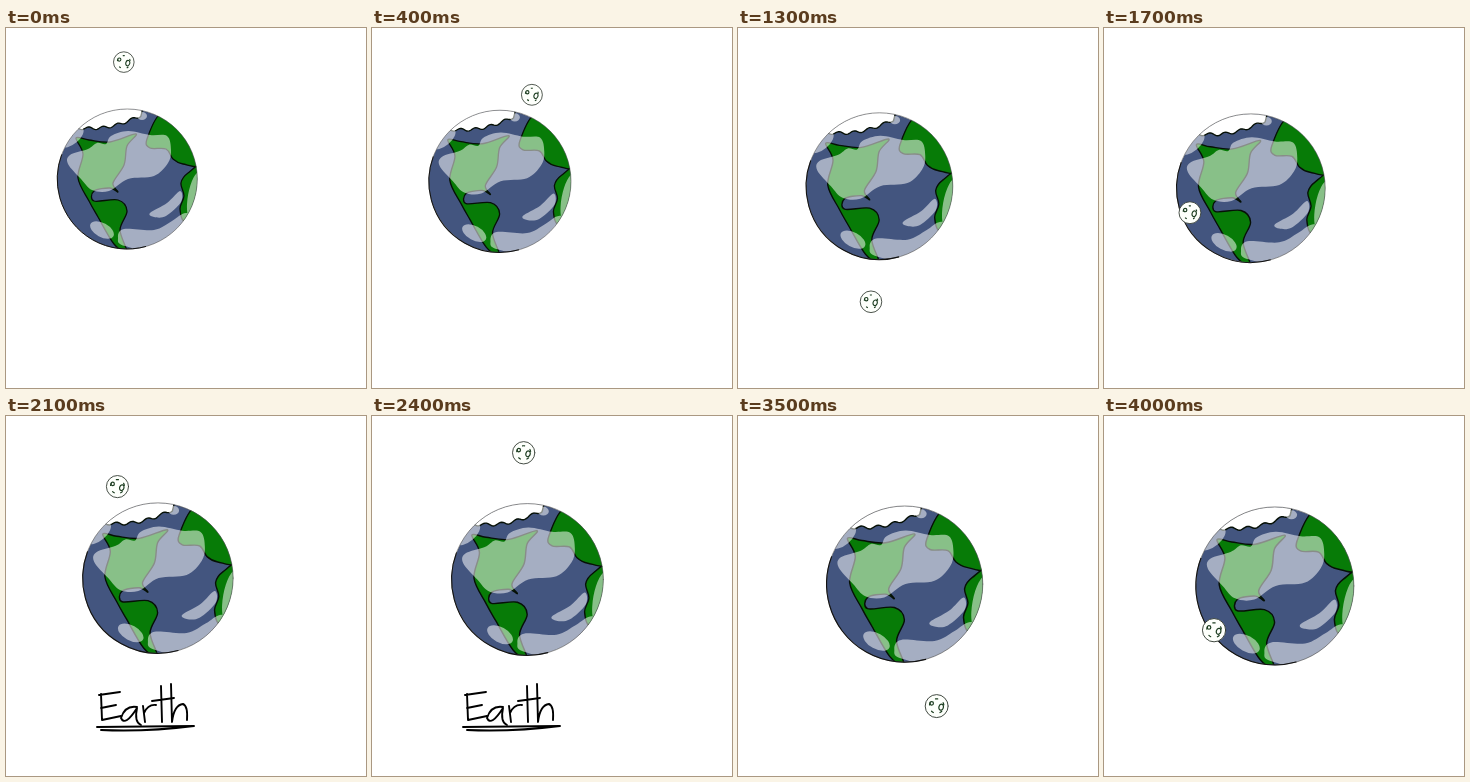
Recreate the animation shown at these times as an HTML page with a canvas. Size 360 by 360 pixels, loop 4.1 s.

```html
<!DOCTYPE html>
<html lang="en">
<head>
<meta charset="utf-8">
<title>Earth and moon</title>
<style>
  html, body { margin: 0; width: 100%; height: 100%; overflow: hidden; background: #fff; }
  canvas { display: block; width: 360px; height: 360px; }
</style>
</head>
<body>
<canvas id="stage" width="360" height="360"></canvas>
<script>
const ctx = document.getElementById('stage').getContext('2d');
const LOOP = 4100, STEP = 100, ORBIT = 2.4, TURN = Math.PI * 2;

// Globe artwork is drawn around this centre and radius.
const BASE = { x: 121.3, y: 151, r: 70 };

// Closed smooth curve through a few key points.
function blob(text) {
  const p = text.split(' ').map(s => s.split(',').map(Number));
  const at = i => p[(i + p.length) % p.length];
  const handle = (i, side) => at(i).map((v, k) => v + side * (at(i + 1)[k] - at(i - 1)[k]) / 6);
  const path = new Path2D();
  path.moveTo(...p[0]);
  p.forEach((_, i) => path.bezierCurveTo(...handle(i, 1), ...handle(i + 1, -1), ...at(i + 1)));
  return path;
}

function oval(x, y, rx, ry, tilt) {
  const path = new Path2D();
  path.ellipse(x, y, rx, ry, tilt, 0, TURN);
  return path;
}

function scallopedCap() {
  const path = new Path2D();
  path.moveTo(104, 60);
  path.lineTo(62, 96);
  for (let u = 0; u <= 1; u += 0.02) {
    path.lineTo(72 + 64 * u, 100 - 13 * u + 5 * Math.sin(Math.PI * u) + 1.4 * Math.sin(28 * u));
  }
  path.lineTo(138, 76);
  path.closePath();
  return path;
}

const americas = blob('70,110 83,112 104,114 130,106 121,118 118,137 107,155 112,164 104,160 88,163 88,173 112,172 121,183 114,202 121,224 108,216 92,189 83,173 72,150 77,126');
const europe = blob('157,84 141,111 144,120 160,121 167,131 177,136 198,136 188,96');
const africa = blob('198,138 182,145 175,155 178,168 174,181 180,194 200,180');
const ice = scallopedCap();

const clouds = new Path2D();
[
  blob('62,136 64,127 82,121 91,115 100,116 105,108 122,103 144,107 161,108 165,122 162,135 148,148 122,151 103,163 86,162 75,151'),
  blob('112,210 118,201 148,202 166,193 180,185 198,190 165,225 119,218'),
  blob('144,185 161,175 174,163 175,174 160,188 148,189'),
  oval(190, 168, 8, 25, 0.18),
  oval(96, 202, 13, 7, 0.5),
  oval(66, 109, 14, 7, -0.7),
  oval(136, 88, 5, 4, 0)
].forEach(c => clouds.addPath(c));

const globe = t => ({
  x: 121.3 + 17 * t - 1.15 * t * t,
  y: 151 + 5.9 * t - 0.29 * t * t,
  r: 70 + 2.75 * t - 0.125 * t * t
});

function pen(color, width) {
  ctx.strokeStyle = color;
  ctx.lineWidth = width;
}

function drawGlobe({ x, y, r }) {
  const disc = oval(BASE.x, BASE.y, BASE.r, BASE.r, 0);
  ctx.save();
  ctx.translate(x, y);
  ctx.scale(r / BASE.r, r / BASE.r);
  ctx.translate(-BASE.x, -BASE.y);

  ctx.save();
  ctx.clip(disc);
  ctx.fillStyle = '#43557f';
  ctx.fill(disc);
  pen('#061006', 1.3);
  for (const [shape, color] of [[americas, '#077b07'], [europe, '#077b07'], [africa, '#077b07'], [ice, '#fff']]) {
    ctx.fillStyle = color;
    ctx.fill(shape);
    ctx.stroke(shape);
  }
  ctx.fillStyle = 'rgba(255,255,255,.52)';
  ctx.fill(clouds);
  ctx.restore();

  pen('#555', 0.6);
  ctx.stroke(disc);
  pen('#111', 1);
  ctx.beginPath();
  ctx.arc(BASE.x, BASE.y, BASE.r, 1.3, 3.5);
  ctx.stroke();
  ctx.restore();
}

// Orbit key points: seconds into the orbit, then x and y in globe radii.
const keys = [
  [0, -0.05, -1.67], [0.4, 0.45, -1.217], [0.9, 0.87, 0.75], [1.2, 0.12, 1.72],
  [1.6, -0.77, 0.56], [1.7, -0.82, 0.33], [2.05, -0.6, -1.08]
];

function key(i) {
  const turn = Math.floor(i / keys.length);
  const [s, ...point] = keys[i - turn * keys.length];
  return [s + turn * ORBIT, ...point];
}

function orbit(phase) {
  const i = keys.findLastIndex(k => k[0] <= phase);
  const [a, b, c, d] = [i - 1, i, i + 1, i + 2].map(key);
  const h = c[0] - b[0], u = (phase - b[0]) / h;
  return [1, 2].map(k => {
    const m0 = (c[k] - a[k]) / (c[0] - a[0]) * h;
    const m1 = (d[k] - b[k]) / (d[0] - b[0]) * h;
    const rise = c[k] - b[k];
    return b[k] + u * (m0 + u * (3 * rise - 2 * m0 - m1 + u * (m0 + m1 - 2 * rise)));
  });
}

function drawMoon(earth, phase) {
  const [x, y] = orbit(phase);
  ctx.save();
  ctx.translate(earth.x + x * earth.r, earth.y + y * earth.r);
  ctx.scale(earth.r / BASE.r, earth.r / BASE.r);
  const disc = oval(0, 0, 10.3, 10.3, 0);
  ctx.fillStyle = '#fdfffb';
  ctx.fill(disc);
  pen('#2b332b', 0.8);
  ctx.stroke(disc);
  pen('#1c3d20', 1.1);
  ctx.stroke(oval(-4.5, -2.5, 1.6, 1.6, 0));
  ctx.stroke(oval(4, 1, 2, 2.7, 0.3));
  for (let i = 0; i < 5; i++) {
    ctx.beginPath();
    ctx.arc(0, 0, 6.5, i * 1.25 + 0.8, i * 1.25 + 1.1);
    ctx.stroke();
  }
  ctx.restore();
}

const letters = [
  'M95 278L96 304M93 279L114 276M95 292L110 289M96 304L115 300',
  'M131 291Q119 289 115 302Q119 311 131 292Q128 306 135 309',
  'M137 290L139 306M138 297Q142 288 150 289',
  'M155 270L156 306M146 285L168 282',
  'M165 268L166 306Q168 289 177 288Q182 290 181 304'
].map(d => new Path2D(d));
const underline = new Path2D('M91 311L188 310Q140 316 95 314');
const rough = new Path2D('M92 315L188 310Q140 319 92 316');
const leftover = new Path2D('M189 296Q204 302 218 298L218 289Q214 296 197 297M208 269L220 268');

function drawScraps() {
  pen('#000', 2.2);
  ctx.stroke(rough);
  pen('#000', 1.7);
  ctx.stroke(leftover);
  for (let i = 0; i < 5; i++) {
    const tall = i > 1 ? 13 : 2;
    ctx.beginPath();
    ctx.moveTo(129 + 12.5 * i, 304 - tall);
    ctx.lineTo(129 + 12.5 * i, 304);
    ctx.stroke();
  }
}

function drawLabel(ms) {
  if (ms < 1900 || ms >= 3200) return;
  ctx.lineCap = ctx.lineJoin = 'round';
  if (ms < 2000 || ms >= 3100) return drawScraps();
  pen('#000', 1.9);
  letters.forEach(letter => ctx.stroke(letter));
  ctx.stroke(underline);
}

function render(now) {
  const ms = Math.floor(now % LOOP / STEP) * STEP;
  const phase = ms % (ORBIT * 1000) / 1000;
  const earth = globe(ms / 1000), behind = phase < 0.9;
  ctx.fillStyle = '#fff';
  ctx.fillRect(0, 0, 360, 360);
  if (behind) drawMoon(earth, phase);
  drawGlobe(earth);
  if (!behind) drawMoon(earth, phase);
  drawLabel(ms);
}

const start = performance.now();
function tick() {
  render(performance.now() - start);
  requestAnimationFrame(tick);
}
tick();
</script>
</body>
</html>
```
